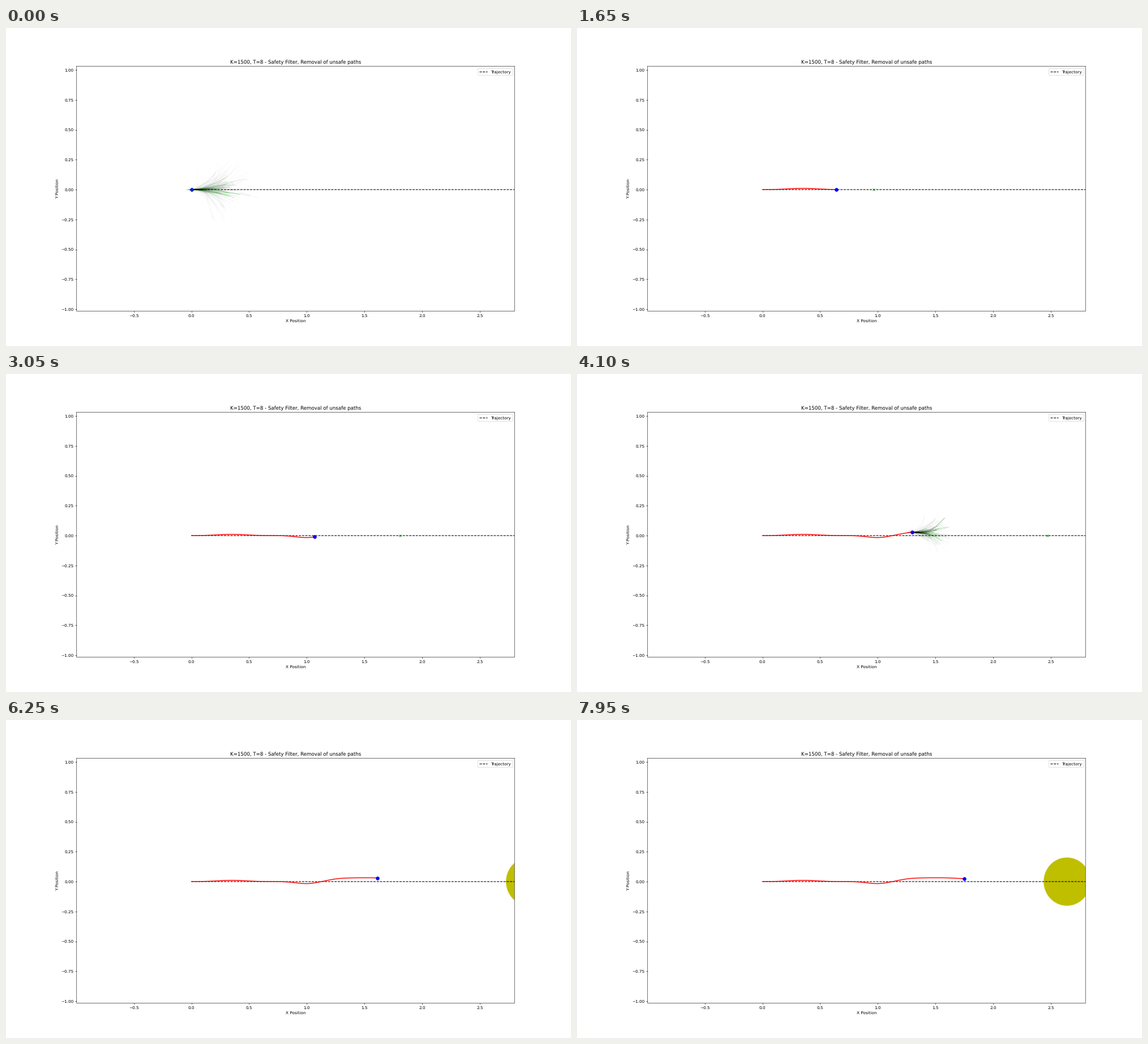
Animation, 998 px wide and 561 px high, one loop 8000 ms. Source, as a matplotlib script:

```python
import matplotlib.pyplot as plt
import numpy as np
from matplotlib.animation import FuncAnimation
from matplotlib.collections import LineCollection

W, H = 998, 561
DPI = W / 19.2
FRAMES, INTERVAL = 160, 50
PATHS, HORIZON = 200, 8
TARGET_STEP = 12 / 199
OBSTACLE_START, OBSTACLE_STEP, OBSTACLE_R = 4.0, 0.017, 0.2

plt.rcParams["text.hinting"] = "none"


def bump(x, height, center, width):
    return height * np.exp(-((x - center) / width) ** 2)


def drift(x):
    """Sideways position of the robot as a function of x."""
    rise = 0.032 / (1 + np.exp(-(x - 1.2) / 0.055))
    return (rise + bump(x, 0.0105, 0.35, 0.18) - bump(x, 0.0175, 1.0, 0.13)
            - bump(x, 0.007, 1.76, 0.11))


# The robot slows down as the obstacle comes closer
half_steps = np.arange(FRAMES // 2) + 0.5
speed = 0.0056 + bump(half_steps, 0.0337, 0, 44)
robot_x = np.concatenate([[0], np.cumsum(speed)])
robot_y = drift(robot_x) - drift(0) * np.exp(-robot_x / 0.1)


def rollouts(k):
    """Sampled paths ahead of the robot and their colours."""
    rng = np.random.default_rng(k + 11)
    mean = speed[k] * (1.0 if k == 0 else 1.2)
    v = rng.normal(mean, 0.031, (PATHS, HORIZON))
    turn = rng.normal(0, 0.12, (PATHS, HORIZON)) + rng.normal(0, 0.07, (PATHS, 1))
    turn[:, 0] *= 0.2
    heading = np.cumsum(turn, axis=1)
    pts = np.zeros((PATHS, HORIZON + 1, 2))
    pts[:, 1:, 0] = np.cumsum(v * np.cos(heading), axis=1)
    pts[:, 1:, 1] = np.cumsum(v * np.sin(heading), axis=1)

    ahead, off = pts[:, -1, 0], np.abs(pts[:, -1, 1])
    luck = rng.random(PATHS)
    reach = np.clip(ahead / (8 * mean + 0.1), 0, 1) ** 2
    safe = (off < 0.12) & (luck > 0.8)
    rgba = np.zeros((PATHS, 4))
    rgba[safe, 1] = 0.72
    rgba[:, 3] = 0.025 + 0.7 * luck ** 5 * np.exp(-off / 0.2) * reach
    order = np.argsort(~safe, kind="stable")
    return pts[order] + (robot_x[k], robot_y[k]), rgba[order]


fig, ax = plt.subplots(figsize=((W + 1e-6) / DPI, (H + 1e-6) / DPI), dpi=DPI)
ax.set_xlim(-0.996, 2.801)
ax.set_ylim(-1.016, 1.033)
ax.set_xticks(np.arange(-0.5, 2.6, 0.5))
ax.set_yticks(np.arange(-1, 1.01, 0.25))
ax.set_xlabel("X Position")
ax.set_ylabel("Y Position")
ax.set_title("K=1500, T=8 - Safety Filter, Removal of unsafe paths")
for spine in ax.spines.values():
    spine.set_snap(False)

obstacle = plt.Circle((OBSTACLE_START, 0), OBSTACLE_R, color="y")
ax.add_patch(obstacle)
fan = LineCollection([], linewidths=1, zorder=1.5)
ax.add_collection(fan, autolim=False)
ax.plot([0, 12], [0, 0], "k--", label="Trajectory", snap=False)
trail, = ax.plot([], [], "r-", lw=2, zorder=2.1)
robot, = ax.plot([], [], "bo", ms=8, zorder=2.2)
target, = ax.plot([], [], "gx", zorder=2.3)
ax.legend(loc="upper right")


def update(frame):
    # Even frames show the sampled paths, odd frames the step taken
    k, moved = divmod(frame, 2)
    n = k + moved
    if moved:
        fan.set_segments([])
    else:
        paths, colors = rollouts(k)
        fan.set_segments(paths)
        fan.set_color(colors)
    target.set_data([k * TARGET_STEP], [0])
    trail.set_data(robot_x[:n + 1], robot_y[:n + 1])
    robot.set_data([robot_x[n]], [robot_y[n]])
    obstacle.center = (OBSTACLE_START - OBSTACLE_STEP * n, 0)
    return obstacle, fan, trail, robot, target


anim = FuncAnimation(fig, update, frames=FRAMES, interval=INTERVAL,
                     init_func=lambda: update(0), repeat=True, repeat_delay=0)
plt.show()
```
